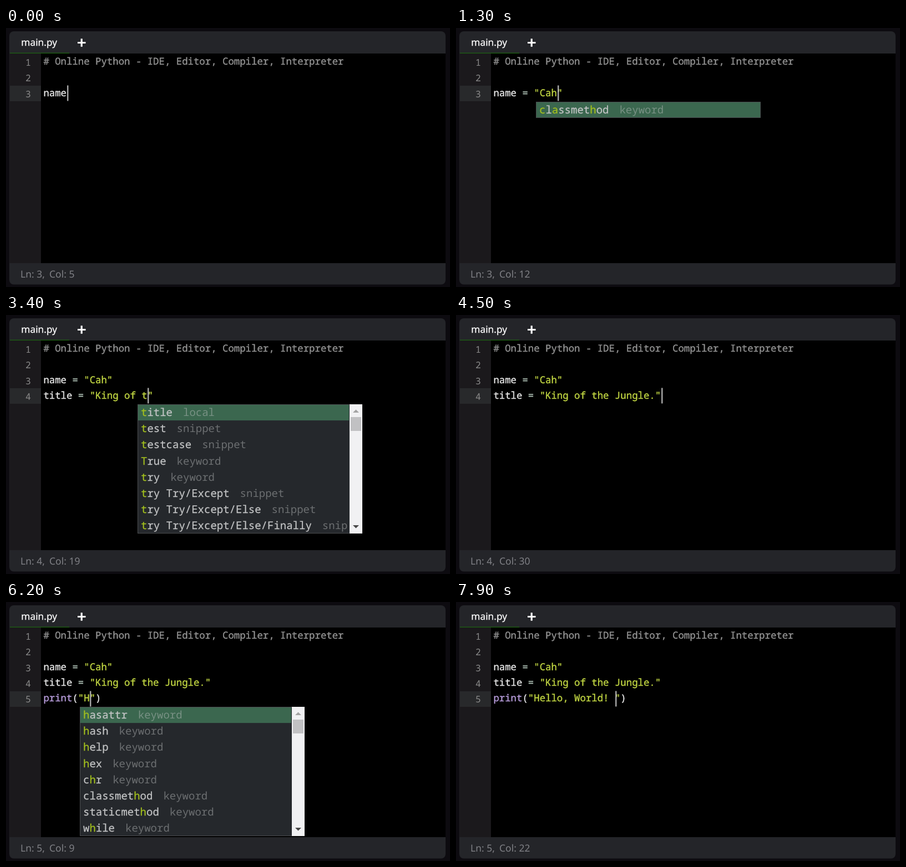
These frames come from a looping animation (800 px wide and 467 px high, 8 s). An HTML page:

```html
<!DOCTYPE html>
<html lang="en">
<head>
<meta charset="utf-8">
<title>Code editor</title>
<style>
  html, body { margin: 0; width: 100%; height: 100%; overflow: hidden; background: #0d0b10; }
  svg { display: block; width: 800px; height: 467px; }
  text { white-space: pre; text-rendering: geometricPrecision; }
  text, tspan { fill: currentColor; }
  .ui { font: 17.5px "Noto Sans", "Open Sans", sans-serif; color: #808186; }
  .tab { font-size: 17.3px; color: #fff; stroke: currentColor; stroke-width: .25; }
  .code, .item { stroke: currentColor; stroke-width: .4; }
  .code tspan, .item tspan { stroke: currentColor; }
  .code { font: 17.35px "Noto Sans Mono", monospace; color: #e6e6e6; }
  .num { font: 16.5px "Noto Sans Mono", monospace; color: #8a8a8a; text-anchor: middle; }
  .item { font: 19px "Noto Sans Mono", monospace; color: #c4c5c6; stroke-width: .25; }
  .comment { color: #929292; }
  .string { color: #c0d542; }
  .call { color: #b69cda; }
  .op { color: #a8b9ae; }
  .hit { color: #a3c01e; }
  .meta { color: rgba(196, 197, 198, .45); stroke-width: 0; }
</style>
</head>
<body>
<svg viewBox="0 0 800 467">
  <rect width="800" height="467" fill="#0d0b10"/>
  <rect x="6" y="6" width="786" height="456.5" rx="8" fill="#242529"/>
  <rect x="6.5" y="46" width="57" height="378" fill="#1b191c"/>
  <rect x="63" y="46" width="729" height="378" fill="#000"/>
  <rect x="7" y="44.6" width="107" height="1.4" fill="#1d5c12"/>
  <text class="ui tab" x="27.3" y="31.7">main.py</text>
  <path d="M129 26.5h14.5M136.2 19.3v14.5" stroke="#fff" stroke-width="3.2"/>
  <g id="editor"></g>
  <text class="ui" y="450"><tspan id="line" x="26"></tspan><tspan id="col" x="78"></tspan></text>
  <clipPath id="clip"><rect id="clipBox" height="467"/></clipPath>
  <g id="popup"></g>
</svg>
<script>
const LOOP = 8000, LEFT = 67.4, ADV = 10.41, TOP = 47.4, LINE = 28.4;
const ITEM = 29.1, POP_W = 405, MAX_ROWS = 8;
const START = '# Online Python - IDE, Editor, Compiler, Interpreter\n\nname';

// [start ms, ms per key, keys]
const TYPING = [
  [200, 200, ' = '], [700, 0, '"'], [900, 200, 'Cah'], [1600, 0, '"'], [1800, 0, '\n'],
  [1900, 100, 'title = "K'], [2900, 70, 'ing of t'], [3450, 50, 'he J'], [3700, 80, 'ungle.'],
  [4500, 0, '"'], [4700, 0, '\n'], [5000, 100, 'print'], [5700, 200, '("'],
  [6100, 150, 'Hello'], [6800, 100, ', World!'], [7700, 0, ' ']
];
const keys = TYPING.flatMap(([at, step, s]) => [...s].map((ch, i) => ({ at: at + i * step, ch })));

const list = (meta, names) => names.split(',').map(name => ({ name, meta }));
const COMPLETIONS = [
  ...list('local', 'title'),
  ...list('snippet', 'test,testcase'),
  ...list('keyword', 'True,try'),
  ...list('snippet', 'try Try/Except,try Try/Except/Else,try Try/Except/Else/Finally,try Try/Except/Finally'),
  ...list('keyword', 'callable,chr,class,classmethod,cmp,compile,complex,continue,hasattr,hash,help,hex'),
  ...list('keyword', 'KeyboardInterrupt,object,oct,open,or,ord,pass,pow,print,property'),
  ...list('snippet', 'pprint'),
  ...list('keyword', 'staticmethod,NotImplemented,while,with')
];

const $ = id => document.getElementById(id);
const span = (cls, s, extra = '') => `<tspan class="${cls}"${extra}>${s}</tspan>`;
const rect = (x, y, w, h, fill, extra = '') =>
  `<rect x="${x}" y="${y}" width="${w}" height="${h}" fill="${fill}" ${extra}/>`;

function tokenClass(s) {
  return s[0] === '#' ? 'comment' : s[0] === '"' ? 'string' : s === '=' ? 'op' : 'call';
}
const colour = s => s.replace(/#.*|"[^"]*"?|\bprint\b|=/g, m => span(tokenClass(m), m));

// Positions of the matched letters: one run if possible, else scattered.
function match(name, word) {
  const n = name.toLowerCase(), w = word.toLowerCase(), run = n.indexOf(w);
  if (run >= 0) return [...w].map((_, i) => run + i);
  const hits = [];
  let from = 0;
  for (const ch of w) {
    const i = n.indexOf(ch, from);
    if (i < 0) return null;
    hits.push(i);
    from = i + 1;
  }
  return hits;
}

function complete(word, text) {
  const found = COMPLETIONS
    .filter(c => c.meta !== 'local' || text.includes(c.name + ' ='))
    .map(c => ({ ...c, hits: match(c.name, word) }))
    .filter(c => c.hits);
  const rank = c => c.name.toLowerCase().startsWith(word.toLowerCase()) ? 0 : 1;
  return found.sort((a, b) => rank(a) - rank(b)).slice(0, MAX_ROWS);
}

function drawEditor(text, tail, cursorOn) {
  const lines = text.split('\n'), row = lines.length - 1, col = lines[row].length;
  const rowTop = Math.round(TOP + row * LINE - .2);
  let out = rect(7, rowTop, 56, 28, '#28292b');
  lines.forEach((s, i) => {
    const y = TOP + i * LINE;
    out += `<text class="num" x="40" y="${y + 20.3}">${i + 1}</text>`;
    out += `<text class="code" x="${LEFT}" y="${y + 18.4}">${colour(i === row ? s + tail : s)}</text>`;
  });
  if (cursorOn) out += rect(Math.round(LEFT + .6 + col * ADV), rowTop - .5, 2.5, 28, '#a4a4a4');
  $('editor').innerHTML = out;
  $('line').textContent = `Ln: ${row + 1},`;
  $('col').textContent = `Col: ${col + 1}`;
}

function scrollbar(x, y, h) {
  const mid = x + 11.5;
  return rect(x, y, 23, h, '#f1f1f3') + rect(x + 2, y + 23, 19, 25, '#c1c1c3') +
    `<path d="M${mid - 5.5} ${y + 15}h11l-5.5-5.5z" fill="#a3a3a3"/>` +
    `<path d="M${mid - 5.5} ${y + h - 15}h11l-5.5 5.5z" fill="#484848"/>`;
}

function drawPopup(text) {
  const lines = text.split('\n'), row = lines.length - 1;
  const word = (lines[row].match(/[A-Za-z]+$/) || [''])[0];
  const items = word ? complete(word, text) : [];
  if (!items.length) {
    $('popup').innerHTML = '';
    return;
  }
  const x = Math.round(60.4 + (lines[row].length - word.length) * ADV);
  const y = Math.round(TOP + (row + 1) * LINE);
  const h = Math.round(items.length * ITEM), full = items.length === MAX_ROWS;
  const inner = POP_W - (full ? 24 : 1);
  $('clipBox').setAttribute('x', x);
  $('clipBox').setAttribute('width', inner - 1);
  let out = rect(x, y, POP_W, h, '#25282c') + rect(x, y, inner, ITEM, '#3b674f');
  items.forEach((c, i) => {
    const name = [...c.name].map((ch, k) => c.hits.includes(k) ? span('hit', ch) : ch).join('');
    out += `<text class="item" clip-path="url(#clip)" x="${x + 6}" y="${y + 21.2 + i * ITEM}">` +
      name + span('meta', c.meta, ' dx="19"') + '</text>';
  });
  out += rect(x + .5, y + .5, POP_W - 1, h - 1, 'none', 'stroke="#4b4d50"');
  if (full) out += scrollbar(x + POP_W - 23, y, h);
  $('popup').innerHTML = out;
}

let shown = '';
function draw() {
  const t = performance.now() % LOOP;
  const text = START + keys.filter(k => k.at <= t).map(k => k.ch).join('');
  const last = text.slice(text.lastIndexOf('\n') + 1);
  const tail = (last.split('"').length % 2 ? '' : '"') + (last.includes('(') ? ')' : '');
  const cursorOn = t < 5500 || t >= 5600;
  const state = text + cursorOn;
  if (state !== shown) {
    shown = state;
    drawEditor(text, tail, cursorOn);
    drawPopup(text);
  }
  requestAnimationFrame(draw);
}
draw();
</script>
</body>
</html>
```
